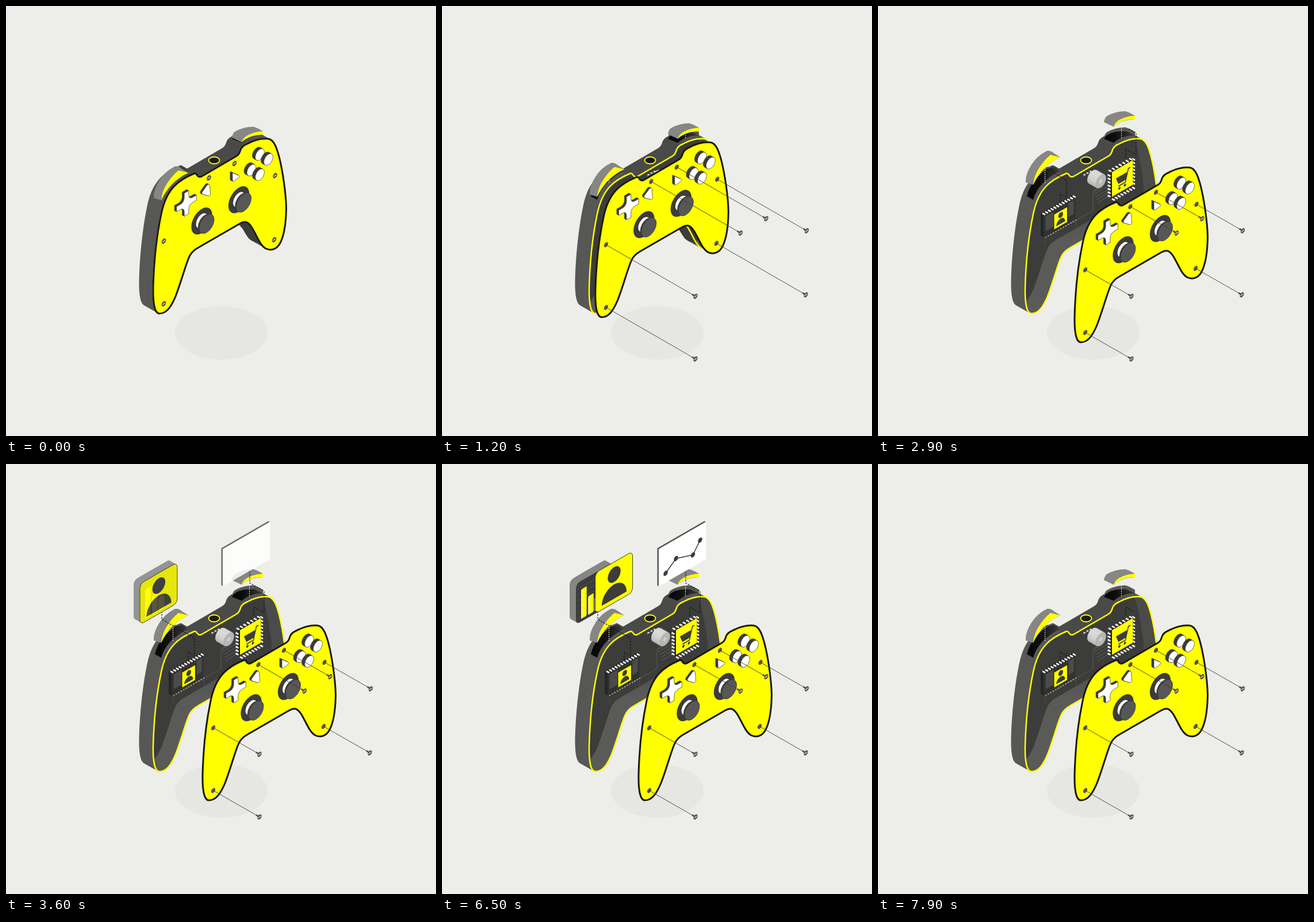
An HTML page that plays this animation: 748 px wide and 748 px high, repeating every 8 s.

```html
<!DOCTYPE html>
<html lang="en">
<head>
<meta charset="utf-8">
<title>Exploded gamepad</title>
<style>
html, body { margin: 0; width: 100%; height: 100%; overflow: hidden; background: #edeee9; }
svg { display: block; width: 100%; height: 100%; }
</style>
</head>
<body>
<svg id="stage" viewBox="0 0 748 748"></svg>
<script>
const LOOP = 8000;
const YELLOW = '#ff0', INK = '#1a1a19', DARK = '#3c3c3b', MID = '#575756', GREY = '#868686';

const range = (n, f) => Array.from({ length: n }, (_, i) => f(i)).join('');
// Places flat artwork on the isometric front plane.
const iso = (x, y, art) => `<g transform="matrix(.866 -.5 0 1 ${x} ${y})">${art}</g>`;
const disc = (x, y, r, fill, extra = '') => iso(x, y, `<circle r="${r}" fill="${fill}" ${extra}/>`);
// Repeats a shape from an offset up to its own place, which gives it depth.
const sweep = (n, dx, dy, art) =>
  range(n, i => `<g transform="translate(${dx * (1 - i / n)} ${dy * (1 - i / n)})">${art}</g>`);
const rect = (x, y, w, h, fill, extra = '') =>
  `<rect x="${x}" y="${y}" width="${w}" height="${h}" fill="${fill}" ${extra}/>`;
const path = (d, fill, extra = '') => `<path d="${d}" fill="${fill}" ${extra}/>`;
const line = (d, color, w, extra = '') => path(d, 'none', `stroke="${color}" stroke-width="${w}" ${extra}`);

const face = 'M267 535C258 535 255.500 515 256 490C257 450 262 400 270 362C274 342 281 326 292 314C303 302 316 296 328 291Q331 291 333 295Q336 299 341 296L401 261Q406 258 408 250Q411 243 419 240C432 233 446 230 456 231C466 232 471 247 475 262C481 285 487 325 487.500 352C487 380 483 402 476 414C470 424 460 426 452 422C443 417 438 404 432 393C428 385 424 378 418 376Q413 375 406 379L335 420Q322 427 318 438C311 455 304 482 295 505C287 524 279 535 267 535Z';
const capL = 'M257 307Q256 293 267 276Q277 260 294 252Q300 251 306 256L317 263Q300 271 288 284Q276 296 270 311Z';
const lipL = 'M270 311Q271 296 280 282Q289 268 300 259L317 263Q300 271 288 284Q277 296 270 311Z';
const capR = 'M393 202Q394 194 399 191Q414 183 430 183Q438 185 447 191V197Q423 198 410 210Z';
const lipR = 'M410 210Q412 201 424 196Q436 191 447 191V197Q432 197 422 202Q415 205 410 210Z';
const slotL = 'M259 331Q262 316 273 303Q284 289 297 282L306 280L316 287Q298 297 286 309Q274 322 270 337Z';
const slotR = 'M393 231Q396 225 405 221Q418 217 432 218L447 225Q425 225 410 238Z';
const wireL = 'M317 341V327L328 334V303L271 270V258';
const wireR = 'M431 264V249L449 259V221L424 207V187';
const holes = [[274.5, 409], [274.5, 518], [353, 299], [397.5, 274], [468, 295], [466.5, 406.5]];
const graph = [[389, 190], [407, 164.500], [436.500, 158], [449, 132.500]];

const user = `<circle cx="38" cy="22" r="13" fill="${DARK}"/>` + path('M13 64A25 25 0 0 1 63 64Z', DARK);

function body() {
  return sweep(24, -24.5, -14, '<use href="#face" fill="url(#side)"/>')
    + path('M405 380L412 388 422 404Q428 410 436 411L460 424 446 418 425 379 413 374Z', DARK)
    + `<g transform="translate(0 28)">${path(capL, MID) + path(capR, MID)}</g>`
    + path(slotL, 'url(#slot)') + path(slotR, 'url(#slot)')
    + '<use href="#face" fill="url(#wall)"/>'
    + `<g clip-path="url(#cavity)"><use href="#face" x="-24" y="-14" fill="${DARK}"/></g>`
    + traces() + userChip() + cartChip() + knob()
    + `<use href="#face" fill="none" stroke="${YELLOW}" stroke-width="2.500"/>`
    + `<ellipse cx="362" cy="268.500" rx="9.500" ry="6" fill="${INK}" stroke="${YELLOW}" stroke-width="1.800"/>`;
}

function traces() {
  return line('M330 381L374 356V324L392 313', '#4b4b4a', 2)
    + range(5, i => line(`M${374 + i * 2} ${322 + i * 5}l24 -14`, '#656564', .9));
}

const pin = (x, y) => line(`M${x} ${y}l-5 -2.500`, '#f6f6f5', 2.700);

function userChip() {
  return sweep(5, -5, -3, iso(288, 364, rect(0, 0, 64, 39, '#262626')))
    + iso(288, 364, rect(0, 0, 64, 39, '#323231') + rect(4, 4, 16, 26, '#4b4b4a') + rect(50, 4, 11, 24, '#4b4b4a'))
    + range(12, i => pin(291 + i * 4.800, 363 - i * 2.750))
    + line('M291 403L345 372', '#c6c6c5', 1.400, 'stroke-dasharray="2.500 2.500"')
    + line('M291 405v10M344 375v10', MID, .8)
    + iso(306, 362.500, rect(0, 0, 27, 27, YELLOW, `stroke="${INK}"`) + `<g transform="scale(.36)">${user}</g>`);
}

function cartChip() {
  return range(8, i => pin(447, 268 + i * 6))
    + range(8, i => pin(412 + i * 5, 338 - i * 2.900))
    + sweep(3, -2, -1.200, iso(406, 290, rect(0, -1, 44, 46, '#262626')))
    + range(7, i => pin(406 + i * 6, 288 - i * 3.400))
    + range(7, i => pin(404.500, 296 + i * 6))
    + iso(407, 289, rect(0, 0, 42, 43, YELLOW)
      + path('M8 15H31L28 27H13Z', DARK)
      + line('M37 10H33L27 31H13', DARK, 2)
      + `<circle cx="15" cy="35.500" r="2.300" fill="${DARK}"/><circle cx="26" cy="35.500" r="2.300" fill="${DARK}"/>`);
}

function knob() {
  const led = (x, y) => line(`M${x} ${y}l-2 -1v4`, '#bbb', .8) + `<circle cx="${x}" cy="${y}" r="1.300" fill="#fff"/>`;
  return led(359.500, 293.500) + led(364.800, 290.600) + led(370, 287.800)
    + sweep(16, -14, -8, disc(387.500, 305, 11, 'url(#metal)'))
    + disc(387.500, 305, 10.800, '#b5b5b4')
    + iso(387.500, 305, line('M-4 0H4M0 -4V4', '#dededd', 1.600));
}

function caps() {
  return line('', '#f2f2f1', 1, 'id="stemL" stroke-dasharray="2 1.500"')
    + line('', '#f2f2f1', 1, 'id="stemR" stroke-dasharray="2 1.500"')
    + `<g id="caps">${path(capL, GREY) + path(lipL, YELLOW) + path(capR, GREY) + path(lipR, YELLOW)}</g>`;
}

function wires() {
  const wire = (d, id) => `<mask id="m${id}" maskUnits="userSpaceOnUse" x="200" y="150" width="300" height="250">`
    + line(d, '#fff', 4, `id="${id}" pathLength="1" stroke-dasharray="1 2"`) + '</mask>'
    + `<g mask="url(#m${id})">${line(d, '#111', 1.100, 'stroke-dasharray="3 2"')}</g>`;
  return wire(wireL, 'wireL') + wire(wireR, 'wireR');
}

function panels() {
  const card = (fill, extra) => rect(0, 0, 75, 71, fill, `rx="8" ${extra || ''}`);
  const bar = (x, y, h) => sweep(3, -2.500, 1, rect(x, y, 8.500, h, '#ffffa8')) + rect(x, y, 8.500, h, YELLOW);
  const back = sweep(12, -11, -6.300, iso(233, 208.500, card(GREY)))
    + iso(233, 208.500, card(DARK)
      + range(6, i => line(`M2 ${11 + i * 10}H73`, MID, .8))
      + bar(13, 15, 50) + bar(27, 34, 31) + bar(40, 43, 22));
  const front = iso(233, 208.500, card(YELLOW, `stroke="${INK}" stroke-width=".8"`) + user);
  const chart = sweep(3, -2.500, -1.500, iso(377, 148, rect(0, 0, 95, 65, MID)))
    + iso(377, 148, rect(0, 0, 95, 65, '#fff'))
    + line('M' + graph.join('L'), DARK, 1.500, 'id="curve" pathLength="1" stroke-dasharray="1 2"')
    + graph.map(([x, y]) => iso(x, y, `<circle class="node" fill="${DARK}"/>`)).join('');
  return `<g class="panel">${back}</g><g class="panel" id="card">${front}</g><g class="panel">${chart}</g>`;
}

function plate() {
  const cross = 'M-4.500 -20H4.500V-12Q5 -5 12 -4.500H20V4.500H12Q5 5 4.500 12V20H-4.500V12Q-5 5 -12 4.500H-20V-4.500H-12Q-5 -5 -4.500 -12Z';
  const key = (dx, dy, shape) => sweep(5, dx, dy, shape(DARK)) + shape('#fff');
  const edge = `stroke="${DARK}" stroke-width=".7" stroke-linejoin="round"`;
  const stick = (x, y) => disc(x, y, 21, DARK) + disc(x, y - .5, 11.500, '#fff')
    + sweep(4, -3, -1.500, disc(x + 8.500, y + 5, 14, DARK))
    + disc(x + 8.500, y + 5, 15, MID, `stroke="${DARK}" stroke-width=".8"`);
  const buttons = [[441.5, 258.5], [456.5, 267], [427, 285.5], [441.5, 293.5]];
  return `<g id="plate"><use href="#face" fill="${YELLOW}" stroke="${INK}" stroke-width="3"/>`
    + key(-3.500, -2, c => iso(314, 343.500, path(cross, c, edge)))
    + key(-3, -1.500, c => path('M341 324L350 311.500Q354 308.500 354.500 313L355.500 327Q355 331 351 330L342 327.500Q340 326 341 324Z', c, edge))
    + key(-4, -2, c => path('M394 290L405 295Q407 296 405.500 298L396 305Q394 306 394 303Z', c, edge))
    + buttons.map(([x, y]) => key(-5, -2.800, c => disc(x, y, 9.200, c, edge))).join('')
    + stick(340.500, 374) + stick(405, 337)
    + holes.map(([x, y]) => disc(x, y, 3.600, MID, `stroke="${DARK}" stroke-width=".8"`)).join('')
    + '</g>';
}

function screws() {
  return holes.map(() => line('', DARK, .9, 'class="lead"')).join('')
    + holes.map(() => `<g class="screw">${line('', MID, 3, 'class="shaft"')}`
      + disc(0, 0, 3.800, MID, `stroke="${DARK}" stroke-width=".6"`)
      + line('M-2.300 1.800L2.300 -1.800', '#e4e4e2', 1.100) + '</g>').join('');
}

const stop = (o, c) => `<stop offset="${o}" stop-color="${c}"/>`;
const stage = document.getElementById('stage');
stage.innerHTML = `<defs><path id="face" d="${face}"/>
  <clipPath id="cavity"><use href="#face"/></clipPath>
  <linearGradient id="side" gradientUnits="userSpaceOnUse" x1="230" y1="0" x2="490" y2="0">
    ${stop(.25, MID) + stop(.4, '#4a4a49') + stop(.7, '#4a4a49') + stop(.82, MID)}</linearGradient>
  <linearGradient id="wall" gradientUnits="userSpaceOnUse" x1="0" y1="330" x2="0" y2="410">
    ${stop(0, '#4b4b4a') + stop(1, '#5a5a59')}</linearGradient>
  <linearGradient id="slot">${stop(.15, '#080808') + stop(.4, '#0f0f0f') + stop(1, DARK)}</linearGradient>
  <linearGradient id="metal" x1="0" y1="0" x2=".4" y2="1">${stop(0, '#e6e6e5') + stop(1, '#9a9a99')}</linearGradient></defs>
  <ellipse cx="374.500" cy="568.500" rx="80.500" ry="46.500" fill="#e6e7e2"/>`
  + body() + caps() + wires() + panels() + plate() + screws();

const $ = id => document.getElementById(id);
const all = c => [...stage.querySelectorAll('.' + c)];
const leads = all('lead'), heads = all('screw'), shafts = all('shaft'), nodes = all('node'), layers = all('panel');
const set = (el, name, v) => el.setAttribute(name, v);
const move = (el, x, y) => set(el, 'transform', `translate(${x} ${y})`);
const clamp = v => Math.min(1, Math.max(0, v));

// Start and end of each move in ms, then of its way back.
const moves = {
  screw: [450, 1080],
  cap: [1000, 1640],
  plate: [1080, 1600],
  wire: [2250, 3250, 7300, 8200],
  panel: [3150, 3750, 7050, 7650],
  curve: [3800, 4450, 6500, 7050],
  card: [3800, 4440, 6370, 6790]
};
const ease = (t, a, b) => (1 - Math.cos(Math.PI * clamp((t - a) / (b - a)))) / 2;

function draw(t) {
  const at = name => {
    const [a, b, c, d] = moves[name];
    return ease(t, a, b) - (c ? ease(t, c, d) : 0);
  };
  const p = at('plate'), s = at('screw'), lift = 27 * at('cap');
  const px = 86 * p, py = 50 * p, sx = 166.5 * s, sy = 96 * s;
  move($('plate'), px, py);
  holes.forEach(([x, y], i) => {
    set(leads[i], 'd', `M${x + px} ${y + py}L${x + sx} ${y + sy}`);
    const k = Math.min(6, sx);
    set(shafts[i], 'd', `M${-k} ${-k * .577}L0 0`);
    move(heads[i], x + sx, y + sy);
  });
  move($('caps'), 0, 27 - lift);
  set($('stemL'), 'd', `M290.500 308V${308 - lift}`);
  set($('stemR'), 'd', `M423.500 230V${230 - lift}`);

  for (const id of ['wireL', 'wireR']) set($(id), 'stroke-dashoffset', 1 - at('wire'));
  for (const el of layers) set(el, 'opacity', at('panel'));
  const c = at('card'), g = at('curve');
  move($('card'), 43 * c, -24.5 * c);
  set($('curve'), 'stroke-dashoffset', 1 - g);
  set($('curve'), 'opacity', g > 0 ? 1 : 0);
  nodes.forEach((n, i) => set(n, 'r', 4.300 * clamp((g - i * .3) / .1)));
}

let start;
function frame(now) {
  start ??= now;
  draw((now - start) % LOOP);
  requestAnimationFrame(frame);
}
draw(0);
requestAnimationFrame(frame);
</script>
</body>
</html>
```
